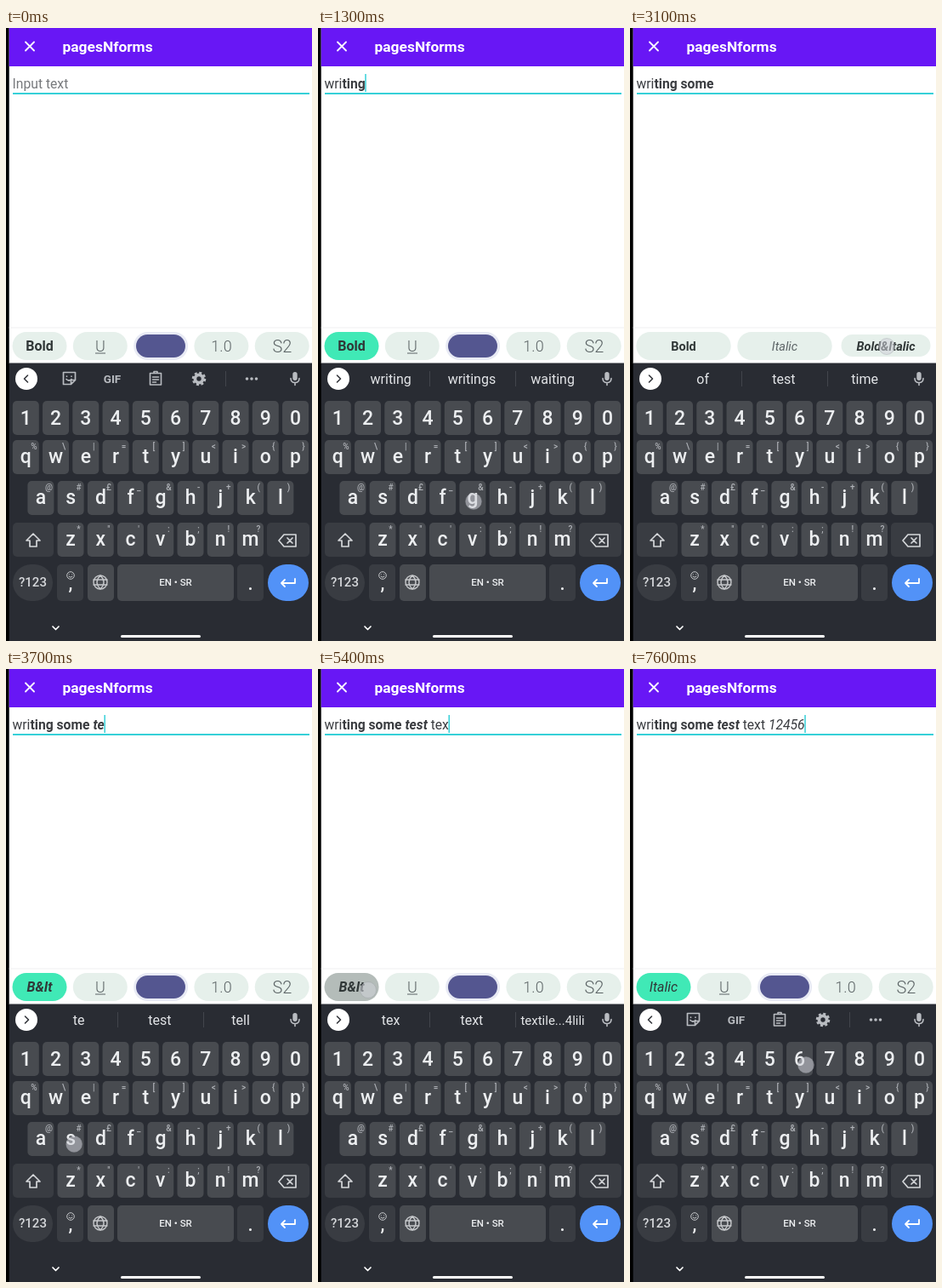
These frames come from a looping animation (360 px wide and 720 px high, 7.7 s). An HTML page:

```html
<!DOCTYPE html>
<html lang="en">
<head>
<meta charset="utf-8">
<style>
html, body { margin: 0; height: 100%; overflow: hidden; background: #000; }
svg { display: block; width: 100vw; height: 100vh; font-family: Roboto, sans-serif; }
text { white-space: pre; }
.m { font-weight: 500; }
.b { font-weight: 700; }
.i { font-style: italic; }
.l { font-weight: 300; }
.line { fill: none; stroke-linecap: round; stroke-linejoin: round; }
</style>
</head>
<body>
<svg viewBox="0 0 360 720">
  <defs>
    <radialGradient id="ripple" cx=".38" r=".62">
      <stop offset="0.3" stop-color="#777" stop-opacity=".6"/>
      <stop offset="1" stop-color="#777" stop-opacity=".06"/>
    </radialGradient>
  </defs>
  <g id="base"></g>
  <g id="live"></g>
</svg>
<script>
const LOOP = 7700, STEP = 100, BLINK = 200;
const TAP = "tap", HOLD = "hold";
const byId = id => document.getElementById(id);
const esc = s => s.replace(/&/g, "&amp;").replace(/</g, "&lt;");

const rect = (x, y, w, h, r, fill) =>
  `<rect x="${x}" y="${y}" width="${w}" height="${h}" rx="${r}" fill="${fill}"/>`;
const circle = (x, y, r, fill, more = "") =>
  `<circle cx="${x}" cy="${y}" r="${r}" fill="${fill}" ${more}/>`;
const line = (d, color, width) =>
  `<path class="line" d="${d}" stroke="${color}" stroke-width="${width}"/>`;
const label = (s, x, y, size, fill, cls = "", anchor = "middle") =>
  `<text x="${x}" y="${y}" font-size="${size}" fill="${fill}" class="${cls}" text-anchor="${anchor}">${esc(s)}</text>`;

// Keyboard rows: characters, hints, first centre, key top, label baseline
const PITCH = 35.25;
const rows = [
  ["1234567890", "", 23.3, 438, 465.5],
  ["qwertyuiop", "%\\|=[]<>{}", 23.3, 484, 510.5],
  ["asdfghjkl", "@#£_&-+()", 40.9, 532, 558.5],
  ["zxcvbnm", "*\"':;!?", 76, 581, 608]
];
const spots = {};

function keyboard() {
  const key = "#484b50", dark = "#393c42", ink = "#eceef0", dim = "#aeb1b6";
  let s = rect(3.7, 393.5, 356.3, 326.5, 0, "#292c33");
  for (const [chars, hints, x0, top, base] of rows) {
    [...chars].forEach((c, n) => {
      const x = x0 + n * PITCH;
      spots[c] = [x + 4, top + 26];
      s += rect(x - 15.5, top, 31, 40, 5, key) + label(c, x, base, 23, ink, "m");
      if (hints) s += label(hints[n], x + 9.5, top + 11, 10, dim, "m");
    });
  }
  Object.assign(spots, { g: [183, 556], 6: [207, 465], " ": [191, 637] });
  s += rect(8, 581, 48, 40, 5, dark) + rect(307, 581, 50, 40, 5, dark);
  s += line("M32 594l-8 8h4v7h8v-7h4z", "#d5d7da", 1.7);
  s += line("M327 595h14v14h-14l-6-7zM331 599l6 6m0-6l-6 6", "#d5d7da", 1.7);
  s += rect(8, 630, 47, 43, 21.5, dark) + label("?123", 31.5, 656, 15, "#d5d7da", "m");
  s += rect(60, 630, 31, 43, 5, dark) + rect(96, 630, 31, 43, 5, key);
  s += rect(131, 630, 137, 43, 5, key) + rect(272, 630, 31, 43, 5, dark);
  s += label(",", 76, 660, 22, ink, "m") + label(".", 287.5, 660, 22, ink, "m");
  s += circle(76, 643, 4.3, "none", 'stroke="#c5c7ca"');
  s += line("M74.3 641.8v.1M77.7 641.8v.1M74 644.3q2 2 4 0", "#c5c7ca", 1);
  s += circle(111, 651, 8, "none", 'stroke="#c5c7ca" stroke-width="1.4"');
  s += line("M103 648h16M103 654h16M111 643q-8 8 0 16q8-8 0-16", "#c5c7ca", 1.3);
  s += label("EN • SR", 199.5, 655, 11.5, "#eceef0", "m");
  s += rect(308, 630, 48, 43, 21.5, "#5292f7");
  s += line("M340 647v5h-16m4-4l-4 4l4 4", "#fff", 1.8);
  s += line("M55 703l3.5 3.5l3.5-3.5", "#fff", 1.7);
  return s + rect(135, 713, 94, 3, 1.5, "#fff");
}

function mic() {
  return rect(337.3, 404, 5.4, 10, 2.7, "#b9bcc1") +
    line("M335 411.5q0 5 5 5t5-5M340 417v2.5", "#b9bcc1", 1.6);
}

byId("base").innerHTML =
  rect(3.7, 0, 356.3, 394, 0, "#fff") + rect(3.7, 0, 356.3, 45, 0, "#6817f5") +
  line("M23 16.5l10 10m0-10l-10 10", "#fff", 1.8) +
  label("pagesNforms", 66.5, 28, 17.4, "#fff", "b", "start") +
  rect(8, 76, 349, 2, 0, "#36d0d8") +
  rect(3.7, 351.5, 356.3, 1, 0, "#f0f0f2") + keyboard() + mic();

// [time, action, how long the touch stays afterwards]
const script = [
  [300, "w"], [400, "r"], [600, "i"], [800, TAP],
  [1000, "t"], [1100, "i"], [1200, "n"], [1300, "g"], [1500, " "],
  [1700, "s"], [1900, "o"], [2000, "m"], [2200, "e", 200], [2400, " "],
  [2800, HOLD], [3100, "Bold&Italic"], [3400, TAP],
  [3600, "t"], [3700, "e"], [3800, "s"], [3900, "t"], [4000, " "], [4300, TAP],
  [4700, "t"], [4900, "e"], [5000, "x"],
  [5500, HOLD], [5700, "Italic"], [5900, "t"], [6200, " "], [6700, TAP],
  [6900, "1"], [7000, "2"], [7100, "4"], [7300, "5", 200], [7600, "6"]
];

// Suggestions after each typed character
const LONG = "textile...4lili";
const hints = [
  "w what with", "wr write writing", "wri write writing", "writ write writing",
  "writi writing write", "writin writing within", "writing writings waiting", "a the and",
  "s so some", "so some sorry", "som some something", "some someone something", "of test time",
  "t the to", "te test tell", "tes test yes", "test tests testing", "images text " + LONG,
  "t the to", "te text test", "tex text " + LONG, "text texts " + LONG, "for me box"
];

const styles = {
  "Bold": ["b", "Bold"],
  "Italic": ["i", "Italic"],
  "Bold&Italic": ["b i", "B&It"]
};
const choices = Object.keys(styles);
const choiceX = [63, 182, 301];

function stateAt(t) {
  const st = { typed: 0, runs: [], style: "Bold", on: false, menu: false, last: 0, ripple: "" };
  for (const [at, act, stay = 100] of script) {
    const lead = act === HOLD ? 300 : 100;
    if (t >= at - lead && t < at + (act === HOLD ? 0 : stay)) {
      const n = choices.indexOf(act);
      st.touch = n >= 0 ? [choiceX[n] + 1, 374] : spots[act] || [59, 377];
      st.pressed = n;
    }
    if (act === TAP && t >= at && t < at + 200) st.ripple = "url(#ripple)";
    if (act === HOLD && t >= at - lead && t < at) st.ripple = "rgba(110,115,115,.42)";
    if (t < at) continue;
    if (act === TAP) st.on = !st.on;
    else if (act === HOLD) st.menu = true;
    else if (styles[act]) {
      // the menu closes once the finger is lifted
      if (t >= at + 100) Object.assign(st, { style: act, on: false, menu: false });
    } else {
      const cls = st.on ? styles[st.style][0] : "", run = st.runs.at(-1);
      if (run && run.cls === cls) run.s += act;
      else st.runs.push({ cls, s: act });
      st.typed++;
      st.last = at;
    }
  }
  return st;
}

function formatBar(st) {
  const pale = "#e6f0eb", ink = "#303737", soft = "#5c6466";
  if (st.menu) {
    return choices.map((c, n) => {
      const down = st.touch && st.pressed === n, x = choiceX[n];
      return (down ? rect(x - 52.5, 360, 105, 26, 13, pale) : rect(x - 55.7, 357, 111.4, 33, 16.5, pale)) +
        label(c, x, 379, 14.5, c === "Italic" ? soft : ink, styles[c][0]);
    }).join("");
  }
  const [cls, name] = styles[st.style];
  let s = "";
  for (let n = 0; n < 5; n++)
    s += rect(7.5 + n * 71.3, 357, 64, 33, 16.5, n === 2 ? "#e8eaf4" : n || !st.on ? pale : "#40e9b6");
  if (st.ripple) s += rect(7.5, 357, 64, 33, 16.5, st.ripple);
  return s + label(name, 39.5, 379, 16, ink, cls) +
    label("U", 111, 380, 18, soft, "l") + rect(105, 381.5, 12, 1, 0, soft) +
    rect(153, 360, 58, 27, 13.5, "#545690") +
    label("1.0", 253.5, 380, 18, soft, "l") + label("S2", 325, 381, 20, soft, "l");
}

function topStrip(st) {
  const words = (hints[st.typed - 1] || "").split(" "), open = words.length > 1;
  const c = "#b9bcc1", rule = x => rect(x, 403, 1, 18, 0, "#42454c");
  const s = circle(24, 412, 13, "#fff") +
    line(open ? "M22.5 408l4 4l-4 4" : "M25.5 408l-4 4l4 4", "#33363b", 1.6);
  if (open) {
    return s + rule(131) + rule(232) +
      words.map((w, n) => label(w, 85.7 + n * 95.2, 417.5, w === LONG ? 15 : 16, "#e3e5e8")).join("");
  }
  return s + line("M67.5 404.5h14v9l-5 5h-9zM81.5 413.5h-5v5M71.5 409v.2M77 409v.2M71 412.5q3 3 6 0", c, 1.7) +
    label("GIF", 125, 417, 13.5, c, "b") +
    line("M169.5 405.5h13v13.5h-13zM174 405v-1.5h4v1.5M172.5 410h7M172.5 413h7M172.5 416h4", c, 1.6) +
    circle(227, 412, 4.6, "none", `stroke="${c}" stroke-width="3.8"`) +
    circle(227, 412, 7, "none", `stroke="${c}" stroke-width="2.6" stroke-dasharray="3 2.5"`) +
    rule(258) + [283.5, 289, 294.5].map(x => circle(x, 412, 1.8, c)).join("");
}

function draw(t) {
  const st = stateAt(t);
  const body = st.runs.map(r => `<tspan class="${r.cls}">${r.s}</tspan>`).join("");
  let s = st.typed
    ? `<text id="entry" x="7.5" y="70.5" font-size="15.7" fill="#3a3c40">${body}</text>`
    : label("Input text", 7.5, 70.5, 15.7, "#77797c", "", "start");
  s += formatBar(st) + topStrip(st);
  if (st.touch)
    s += circle(...st.touch, 9.5, "#d0d2d8", 'fill-opacity=".55" stroke="#90929a" stroke-opacity=".3"');
  byId("live").innerHTML = s;
  if (st.typed && Math.floor((t - st.last) / BLINK) % 2 === 0) {
    const x = 7.5 + byId("entry").getComputedTextLength();
    byId("live").innerHTML += rect(x - 0.4, 54, 1.5, 21, 0, "#36d0d8");
  }
}

let start, shown = -1;
function tick(now) {
  start ??= now;
  const t = Math.floor((now - start) % LOOP / STEP) * STEP;
  if (t !== shown) draw(shown = t);
  requestAnimationFrame(tick);
}
draw(0);
requestAnimationFrame(tick);
</script>
</body>
</html>
```
